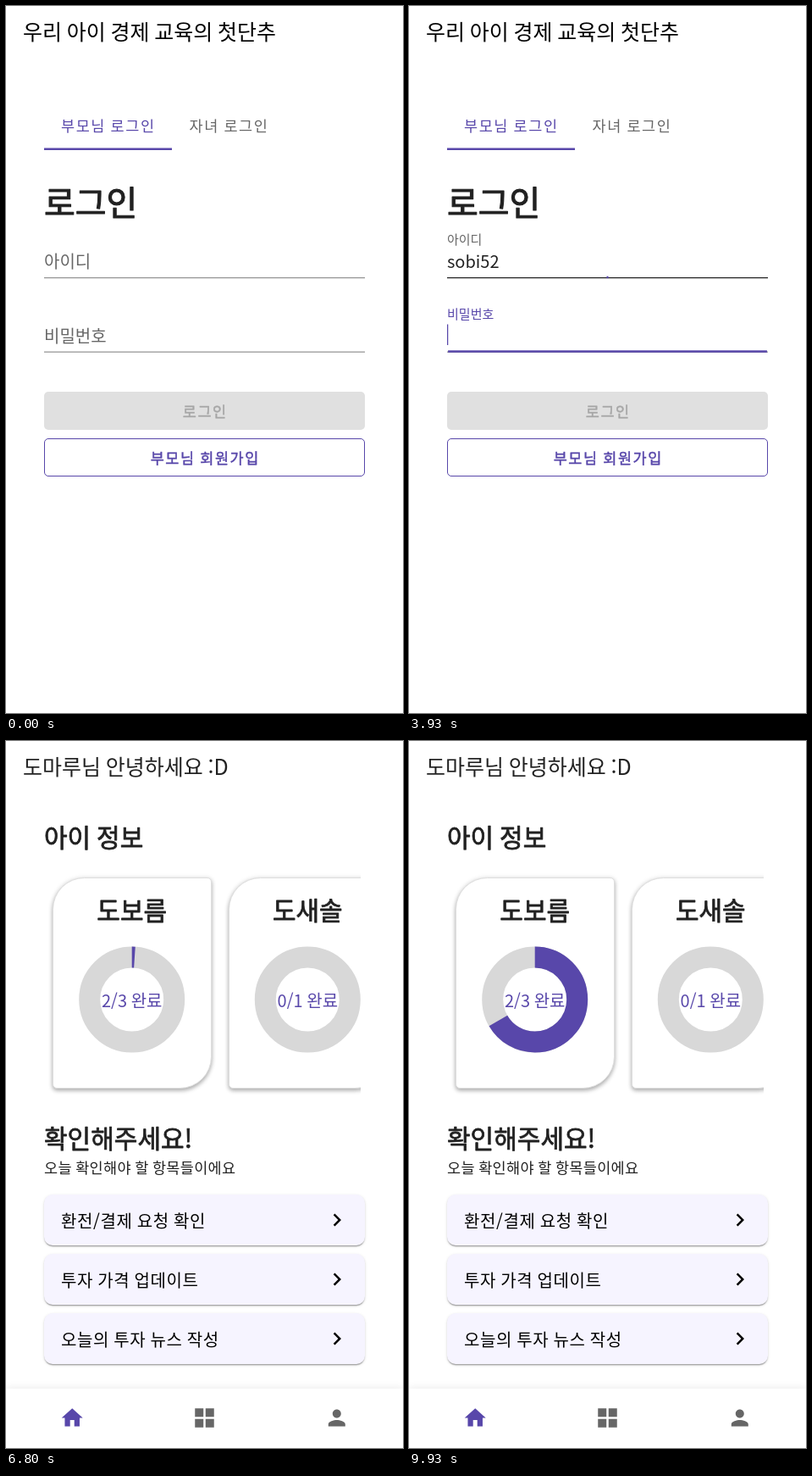
These frames come from a looping animation (469 by 834 pixels, 9990 ms). An HTML page:

```html
<!DOCTYPE html>
<html lang="ko">
<head>
<meta charset="utf-8">
<title>로그인</title>
<style>
:root { --main: #5847aa; --ink: #212121; --soft: #666; }
html, body { margin: 0; width: 100%; height: 100%; overflow: hidden; background: #fff; }
#stage { position: relative; width: 469px; height: 834px; overflow: hidden; }
.page, svg { position: absolute; left: 0; top: 0; width: 469px; height: 834px; }
#home { visibility: hidden; }
.page div { position: absolute; box-sizing: border-box; }

text { font-family: "Noto Sans CJK KR", "Noto Sans KR", "Noto Sans CJK JP", sans-serif; font-size: 20px; word-spacing: -.05em; fill: var(--ink); stroke: none; white-space: pre; }
.mid { text-anchor: middle; }
.h1 { font-size: 40px; }
.h2 { font-size: 30px; }
.bar { font-size: 25px; }
.cap { font-size: 17.5px; letter-spacing: 1.5625px; }
.sub { font-size: 17.5px; letter-spacing: .3125px; }
.item { letter-spacing: .625px; fill: #000; }
.main { fill: var(--main); }
.soft { fill: var(--soft); }
/* medium weight: the regular face, slightly thickened */
.h1, .h2, .bold { stroke: var(--ink); stroke-width: .026em; stroke-linejoin: round; }
.bold.main { stroke: var(--main); }
#offText { fill: #a6a6a6; stroke: #a6a6a6; }
#onText { fill: #fff; stroke: #fff; }

.btn { left: 45px; width: 379px; height: 45px; border-radius: 5px; }
.off { top: 455px; background: #e0e0e0; }
.on { top: 455px; background: var(--main); opacity: 0;
  box-shadow: 0 3.75px 1.25px -2.5px rgba(0,0,0,.2), 0 2.5px 2.5px rgba(0,0,0,.14), 0 1.25px 6.25px rgba(0,0,0,.12); }
.line { top: 510px; border: 1px solid var(--main); }

.page .cards { left: 40px; top: 140px; width: 379px; height: 290px; overflow: hidden; }
.card { top: 20.5px; width: 187.5px; height: 249.5px; border: 1px solid #dedede; background: #fff;
  border-radius: 37.5px 5px 37.5px 5px;
  box-shadow: 0 2.5px 5px rgba(0,0,0,.3), 0 0 6px rgba(0,0,0,.08); }
.row { left: 45px; width: 379px; height: 60.5px; border-radius: 10px; background: #f6f4ff;
  box-shadow: 0 2.5px 1.25px -1.25px rgba(0,0,0,.2), 0 1.25px 1.25px rgba(0,0,0,.14), 0 1.25px 3.75px rgba(0,0,0,.12); }
.nav { left: 0; top: 764px; width: 469px; height: 70px; background: #fff; box-shadow: 0 0 10px rgba(0,0,0,.09); }
.ring { fill: none; stroke-width: 25; stroke: #d8d8d8; }
</style>
</head>
<body>
<div id="stage">
  <div class="page" id="login">
    <div class="btn off"></div>
    <div class="btn on" id="ready"></div>
    <div class="btn line"></div>
    <svg viewBox="0 0 469 834">
      <text class="cap main" x="65" y="148">부모님 로그인</text>
      <text class="cap soft" x="216.5" y="148">자녀 로그인</text>
      <rect class="main" x="45" y="167.5" width="151" height="2.5"/>
      <text class="h1" x="45" y="247">로그인</text>

      <g id="user" transform="translate(45 0)">
        <rect class="rule" y="320" width="379" height="1.25" fill="#949494"/>
        <rect class="glow main" y="318.75" width="379" height="2.5"/>
        <text class="label">아이디</text>
        <text class="value" y="309"></text>
        <rect class="caret main" y="288" width="1.25" height="24.5"/>
      </g>
      <g id="pass" transform="translate(45 87.5)">
        <rect class="rule" y="320" width="379" height="1.25" fill="#949494"/>
        <rect class="glow main" y="318.75" width="379" height="2.5"/>
        <text class="label">비밀번호</text>
        <g id="dots" fill="#212121"></g>
        <rect class="caret main" y="288" width="1.25" height="24.5"/>
      </g>

      <text class="cap bold mid" x="235.3" y="485" id="offText">로그인</text>
      <text class="cap bold mid" x="235.3" y="485" id="onText">로그인</text>
      <text class="cap bold mid main" x="235.3" y="540">부모님 회원가입</text>
      <circle id="touch" cx="248.5" cy="338.5" r="11" fill="#505050" fill-opacity=".35"/>
    </svg>
  </div>

  <div class="page" id="home">
    <div class="cards">
      <div class="card" style="left:15px"></div>
      <div class="card" style="left:222.5px"></div>
    </div>
    <div class="row" style="top:534.5px"></div>
    <div class="row" style="top:604.5px"></div>
    <div class="row" style="top:674.5px"></div>
    <div class="nav"></div>
    <svg viewBox="0 0 469 834">
      <text class="h2" x="45" y="125">아이 정보</text>
      <g transform="translate(148.7 305)">
        <text class="h2 mid" y="-94">도보름</text>
        <circle class="ring" r="50"/>
        <circle class="ring" id="arc" r="50" pathLength="360" transform="rotate(-90)" style="stroke:var(--main)"/>
        <text class="mid main" y="9">2/3 완료</text>
      </g>
      <g transform="translate(356.3 305)">
        <text class="h2 mid" y="-94">도새솔</text>
        <circle class="ring" r="50"/>
        <text class="mid main" y="9">0/1 완료</text>
      </g>
      <text class="h2" x="45" y="480">확인해주세요!</text>
      <text class="sub" x="45" y="510">오늘 확인해야 할 항목들이에요</text>

      <text class="item" x="65" y="574">환전/결제 요청 확인</text>
      <text class="item" x="65" y="644">투자 가격 업데이트</text>
      <text class="item" x="65" y="714">오늘의 투자 뉴스 작성</text>
      <defs><path id="next" d="M10 6L8.59 7.41 13.17 12l-4.58 4.59L10 18l6-6z" transform="scale(1.25)"/></defs>
      <use href="#next" x="376" y="550"/>
      <use href="#next" x="376" y="620"/>
      <use href="#next" x="376" y="690"/>

      <path class="main" transform="translate(63.2 783.5) scale(1.25)" d="M10 20v-6h4v6h5v-8h3L12 3 2 12h3v8z"/>
      <path class="soft" transform="translate(219.5 783.5) scale(1.25)" d="M3 3h8v8H3zM13 3h8v8h-8zM3 13h8v8H3zM13 13h8v8h-8z"/>
      <path class="soft" transform="translate(375.8 783.5) scale(1.25)" d="M12 12c2.21 0 4-1.79 4-4s-1.79-4-4-4-4 1.79-4 4 1.79 4 4 4zm0 2c-2.67 0-8 1.34-8 4v2h16v-2c0-2.66-5.33-4-8-4z"/>
    </svg>
  </div>

  <svg viewBox="0 0 469 834"><text class="bar" id="title" x="20" y="40"></text></svg>
</div>

<script>
const LOOP = 9990;
const USER = 'sobi52';
const userKeys = [2470, 2530, 2600, 2800, 3330, 3400];
const passKeys = [4330, 4470, 4600, 4730, 5000, 5130];
const $ = s => document.querySelector(s);
const clamp = v => Math.min(1, Math.max(0, v));
const show = (el, on) => { el.style.display = on ? '' : 'none'; };
const within = (t, spans) => spans.some(([a, b]) => t >= a && t < b);
const typed = (t, keys) => keys.filter(k => t >= k).length;

function bezier(x1, y1, x2, y2) {
  const at = (a, b, s) => 3 * a * s * (1 - s) ** 2 + 3 * b * s * s * (1 - s) + s ** 3;
  return x => {
    let lo = 0, hi = 1;
    for (let i = 0; i < 30; i++) {
      const m = (lo + hi) / 2;
      if (at(x1, x2, m) < x) lo = m; else hi = m;
    }
    return at(y1, y2, lo);
  };
}
const easeOut = bezier(0, 0, .2, 1);
const ease = bezier(.25, .1, .25, 1);
const tween = (t, start, length) => easeOut(clamp((t - start) / length));

function along(t, points) {
  for (let i = 1; i < points.length; i++) {
    const [t0, v0] = points[i - 1], [t1, v1] = points[i];
    if (t < t1) return v0 + (v1 - v0) * clamp((t - t0) / (t1 - t0));
  }
  return points[points.length - 1][1];
}

const field = id => {
  const part = name => $(`#${id} .${name}`);
  return { rule: part('rule'), glow: part('glow'), label: part('label'), value: part('value'), caret: part('caret') };
};
const user = field('user'), pass = field('pass');

for (let i = 0; i < passKeys.length; i++) {
  const dot = document.createElementNS('http://www.w3.org/2000/svg', 'circle');
  dot.setAttribute('cx', 3.7 + 6.8 * i);
  dot.setAttribute('cy', 302.5);
  dot.setAttribute('r', 2.6);
  $('#dots').append(dot);
}

function drawField(f, enter, leave, caretOn, caretX) {
  const focus = enter * (1 - leave);
  f.label.setAttribute('transform', `translate(0 ${309 - 28 * enter}) scale(${1 - .25 * enter})`);
  f.label.style.fill = `color-mix(in srgb, #5847aa ${100 * focus}%, #666)`;
  f.glow.setAttribute('transform', `translate(189.5 0) scale(${focus} 1) translate(-189.5 0)`);
  show(f.glow, focus > 0);
  show(f.caret, caretOn);
  f.caret.setAttribute('x', caretX);
}

function draw(t) {
  const inside = t >= 6065;
  $('#login').style.visibility = inside ? 'hidden' : 'visible';
  $('#home').style.visibility = inside ? 'visible' : 'hidden';
  const greeted = t >= 5990;
  $('#title').textContent = greeted ? '도마루님 안녕하세요 :D' : '우리 아이 경제 교육의 첫단추';
  $('#title').style.fill = greeted ? '#212121' : '#000';
  show($('#touch'), within(t, [[670, 730]]));

  user.value.textContent = USER.slice(0, typed(t, userKeys));
  const textEnd = user.value.textContent ? user.value.getComputedTextLength() : 0;
  user.rule.setAttribute('fill', t >= 1060 ? '#212121' : '#949494');
  const swap = tween(t, 3590, 380);
  drawField(user, tween(t, 1060, 440), swap,
    within(t, [[1130, 1670], [2070, 3270], [3330, 3600]]), textEnd);

  const count = typed(t, passKeys);
  [...$('#dots').children].forEach((dot, i) => show(dot, i < count));
  drawField(pass, swap, 0, within(t, [[3600, 4200], [4330, 5670]]), count * 6.8);

  // The button starts to wake, pauses, then fills in.
  const ready = along(t, [[4320, 0], [4330, .15], [4400, .15], [4600, 1]]);
  $('#ready').style.opacity = ready;
  $('#onText').style.opacity = ready;
  $('#offText').style.opacity = 1 - ready;

  // The chart crawls, then finishes at full speed.
  const part = ease(along(t, [[6130, 0], [6800, .029], [9150, .1765], [9930, 1]]));
  $('#arc').setAttribute('stroke-dasharray', `${240 * part} 360`);
}

const start = performance.now();
function tick() {
  draw((performance.now() - start) % LOOP);
  requestAnimationFrame(tick);
}
tick();
</script>
</body>
</html>
```
